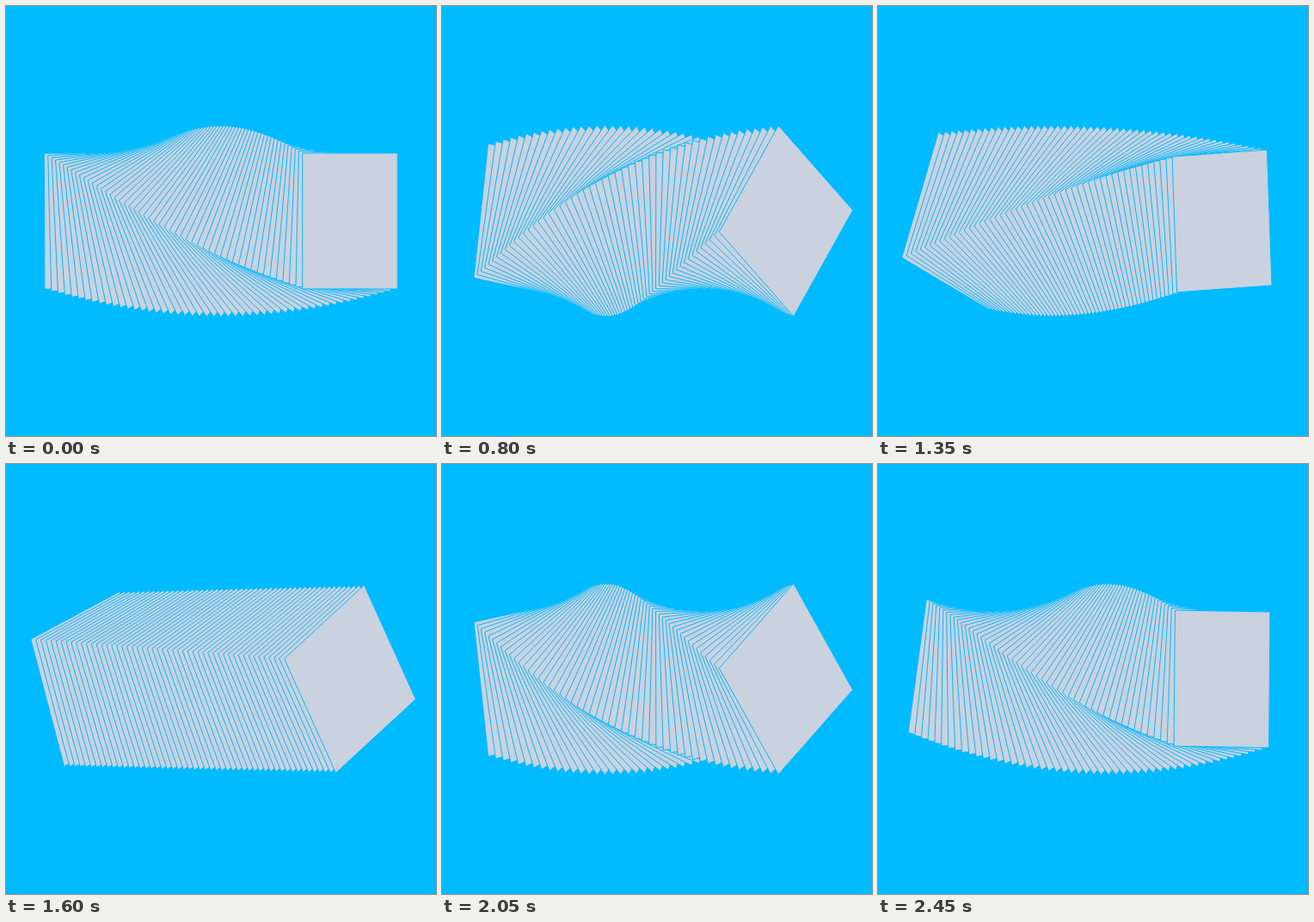
Animation of 500x500 px, one loop 2500 ms. Source, as an HTML page with a canvas:

```html
<!DOCTYPE html>
<html lang="en">
<head>
<meta charset="utf-8">
<title>Twisting squares</title>
<style>
  html, body { margin: 0; width: 100%; height: 100%; overflow: hidden; background: #00bbff; }
  canvas { display: block; width: 500px; height: 500px; }
</style>
</head>
<body>
<canvas id="stage" width="500" height="500"></canvas>
<script>
  const ctx = document.getElementById('stage').getContext('2d');
  const LOOP = 2500;
  const STEPS = 50;
  const HALF = 79;
  const SQUEEZE = 0.7;
  const QUARTER = Math.PI / 2;

  const lerp = (a, b, k) => a + (b - a) * k;

  // A square turned by angle, then narrowed horizontally.
  function drawSquare(cx, cy, angle) {
    ctx.save();
    ctx.translate(cx, cy);
    ctx.scale(SQUEEZE, 1);
    ctx.rotate(angle);
    ctx.beginPath();
    ctx.rect(-HALF, -HALF, 2 * HALF, 2 * HALF);
    ctx.restore();
    ctx.fill();
    ctx.stroke();
  }

  function draw(time) {
    const phase = (time % LOOP) / LOOP * 2 * Math.PI;
    const left = -QUARTER * Math.sin(phase);
    const right = -QUARTER * Math.cos(phase);

    ctx.fillStyle = '#00bbff';
    ctx.fillRect(0, 0, 500, 500);
    ctx.fillStyle = '#cad1df';
    ctx.strokeStyle = '#00bbff';
    ctx.lineWidth = 1;
    for (let i = 0; i <= STEPS; i++) {
      const k = i / STEPS;
      drawSquare(lerp(100, 400, k), 250, lerp(left, right, k));
    }
  }

  function tick() {
    draw(performance.now());
    requestAnimationFrame(tick);
  }
  tick();
</script>
</body>
</html>
```
